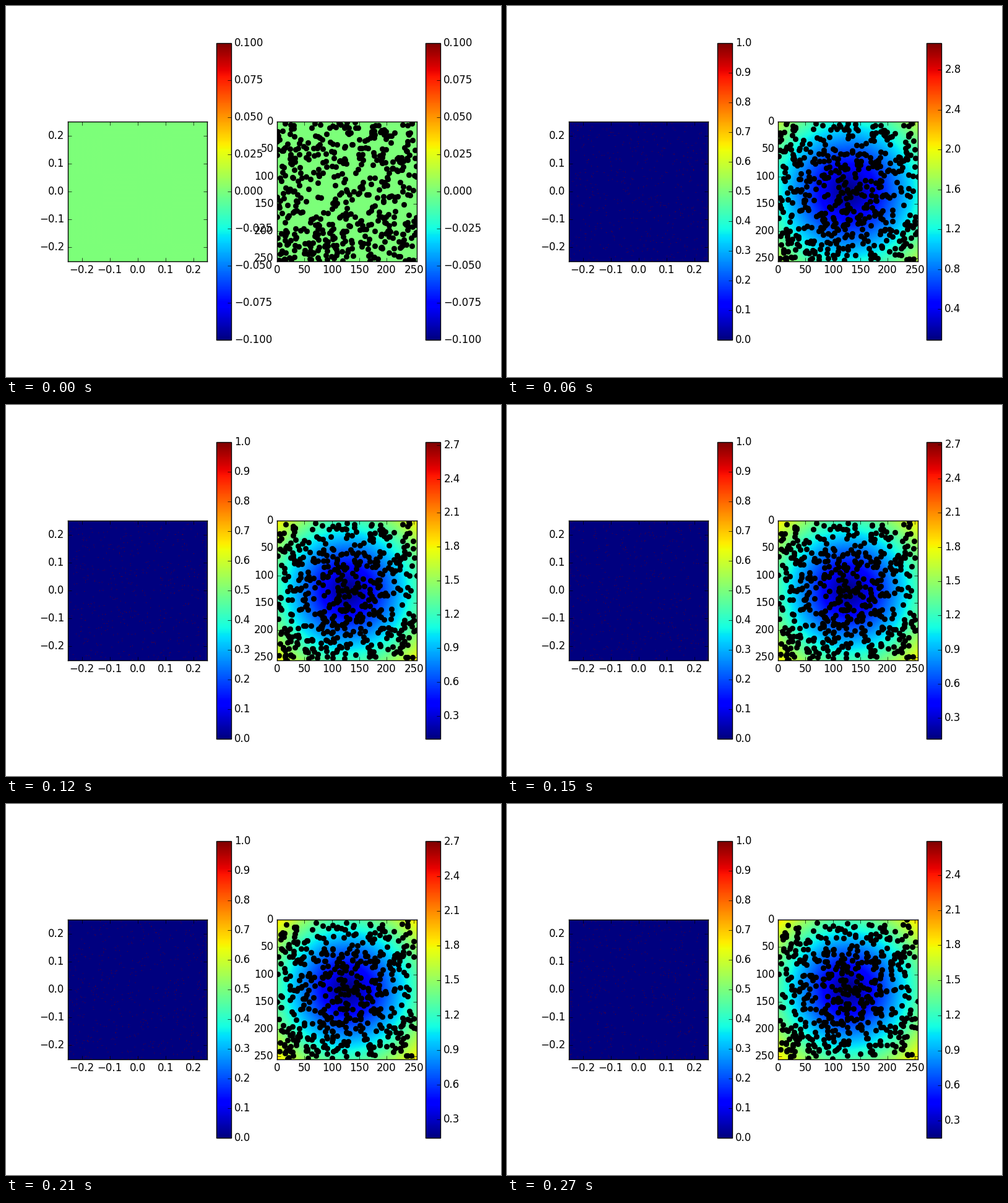
Animation of 800x600 px, one loop 300 ms. Source, as a matplotlib script:

```python
import numpy as np
import matplotlib.pyplot as plt
from matplotlib.animation import FuncAnimation

plt.style.use("classic")
plt.rcParams["font.family"] = "DejaVu Sans"

N = 256
COUNT = 500
FRAMES = 10
CENTER = np.array([122.0, 126.0])

rng = np.random.default_rng(12)
start = rng.uniform(0, N, (COUNT, 2))
drift = rng.normal(0, 0.6, (COUNT, 2))

yy, xx = np.mgrid[0:N, 0:N]
radius = np.hypot(xx - N / 2, yy - N / 2)


def particles(k):
    """Positions that fall towards the middle, leaving a thin ring behind."""
    if k == 0:
        return np.floor(start)
    offset = start - CENTER
    r = np.hypot(*offset.T)[:, None]
    core = (0.1 + 0.008 * k) * np.exp(-(r / 60) ** 2)
    disk = 0.14 / (1 + np.exp((r - 102) / 6))
    pull = core + disk + 0.006 * k
    return np.floor((CENTER + offset * (1 - pull) + drift * k) % N)


def potential(k):
    """Smooth cone-shaped field."""
    if k == 0:
        return np.zeros((N, N))
    return field_range(k)[0] + 1.72 * (radius / 180) ** 1.2


def field_range(k):
    if k == 0:
        return -0.1, 0.1
    low = np.interp(k, [1, 2, 4, 6, 8, 9], [0.074, 0.09, 0.097, 0.139, 0.14, 0.152])
    high = np.interp(k, [1, 2, 4, 6, 8, 9], [3.886, 3.067, 2.727, 2.711, 2.698, 2.691])
    return low, high


def density(k):
    grid = np.zeros((N, N))
    if k:
        cells = np.random.default_rng(100 + k).integers(0, N, (COUNT, 2))
        grid[cells[:, 0], cells[:, 1]] = 1
    return grid


def rescale(image, bar, limits, step, digits):
    low, high = limits
    image.set_clim(low, high)
    first, last = np.ceil(low / step - 1e-6), np.floor(high / step + 1e-6)
    ticks = np.arange(first, last + 1) * step
    labels = [f"{t + 0.0:.{digits}f}".replace("-", "\u2212") for t in ticks]
    bar.set_ticks(ticks, labels=labels)


fig, (left, right) = plt.subplots(1, 2, figsize=(8, 6), dpi=100, facecolor="white")

mass = left.imshow(density(0), cmap="jet", vmin=-0.1, vmax=0.1,
                   extent=(-0.25, 0.25, -0.25, 0.25),
                   interpolation="bilinear", interpolation_stage="rgba")
left.set_xticks([-0.2, -0.1, 0, 0.1, 0.2])
left.set_yticks([-0.2, -0.1, 0, 0.1, 0.2])
mass_bar = fig.colorbar(mass, ax=left)

field = right.imshow(potential(0), cmap="jet", vmin=-0.1, vmax=0.1)
dots, = right.plot([], [], "ko")
right.set_xlim(0, N - 1)
right.set_ylim(N - 1, 0)
right.set_xticks(range(0, N, 50))
right.set_yticks(range(0, N, 50))
field_bar = fig.colorbar(field, ax=right)


def update(k):
    mass.set_data(density(k))
    field.set_data(potential(k))
    dots.set_data(*particles(k).T)
    if k == 0:
        rescale(mass, mass_bar, (-0.1, 0.1), 0.025, 3)
        rescale(field, field_bar, (-0.1, 0.1), 0.025, 3)
    else:
        limits = field_range(k)
        rescale(mass, mass_bar, (0, 1), 0.1, 1)
        rescale(field, field_bar, limits, 0.4 if limits[1] > 3 else 0.3, 1)
    return mass, field, dots


anim = FuncAnimation(fig, update, frames=FRAMES, interval=30, repeat=True,
                     repeat_delay=0, init_func=lambda: update(0), blit=False)
plt.show()
```
